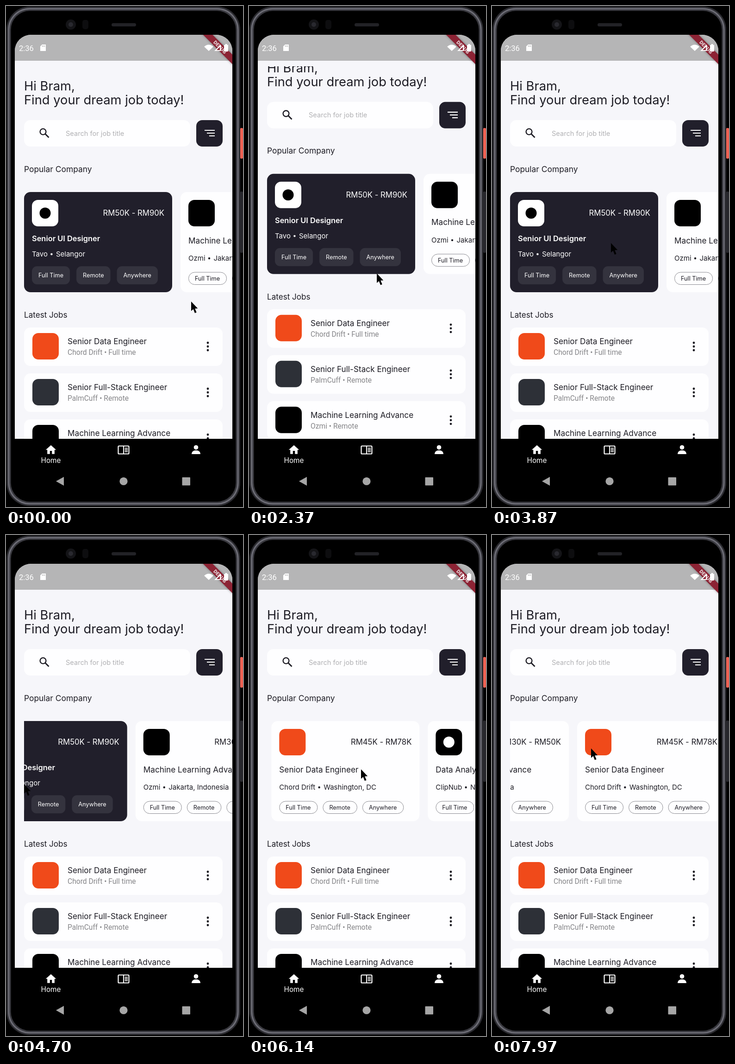
An HTML page with a canvas that plays this animation: 512 px wide and 1080 px high, repeating every 8000 ms.

```html
<!DOCTYPE html>
<html lang="en">
<head>
<meta charset="utf-8">
<title>Job finder</title>
<style>
html, body { margin: 0; width: 100%; height: 100%; overflow: hidden; background: #000; }
canvas { display: block; width: 100vw; height: 100vh; }
</style>
</head>
<body>
<canvas id="stage" width="512" height="1080"></canvas>
<script>
const ctx = document.getElementById('stage').getContext('2d');
const LOOP = 8000;
const SANS = 'Inter, sans-serif';
const ROBOTO = 'Roboto, sans-serif';
const INK = '#1d1c24', DARK = '#211f2b', PAPER = '#f6f6fa', CARD = '#fefeff';
const ORANGE = '#f04a1a', RIBBON = '#8c2334', BAR = '#b5b5b6';
const PITCH = 338;

const companies = [
  { name: 'Tavo', city: 'Selangor', role: 'Senior UI Designer', pay: 'RM50K - RM90K', tile: '#fff', mark: '#000' },
  { name: 'Ozmi', city: 'Jakarta, Indonesia', role: 'Machine Learning Advance', pay: 'RM30K - RM50K', tile: '#000' },
  { name: 'Chord Drift', city: 'Washington, DC', role: 'Senior Data Engineer', pay: 'RM45K - RM78K', tile: ORANGE },
  { name: 'ClipNub', city: 'New York, US', role: 'Data Analyst', pay: 'RM55K - RM80K', tile: '#000', mark: '#fff' }
];
const jobs = [
  { role: 'Senior Data Engineer', info: 'Chord Drift • Full time', tile: ORANGE },
  { role: 'Senior Full-Stack Engineer', info: 'PalmCuff • Remote', tile: '#2d3037' },
  { role: 'Machine Learning Advance', info: 'Ozmi • Remote', tile: '#000' },
  { role: 'System Safety Engineer', info: 'Mulbo.inc • Remote', tile: '#000', mark: '#fff' }
];
const labels = ['Full Time', 'Remote', 'Anywhere'];

// Places the pointer passes through
const stops = [
  { t: 0, x: 400, y: 637 },
  { t: 1670, x: 355, y: 656 },
  { t: 2930, x: 220, y: 520 },
  { t: 3870, x: 257, y: 511 },
  { t: 4700, x: 39, y: 537 },
  { t: 6140, x: 242, y: 505 },
  { t: 7970, x: 214, y: 460 }
];

const mix = (a, b, p) => a + (b - a) * p;

function ramp(t, from, to) {
  const p = Math.min(1, Math.max(0, (t - from) / (to - from)));
  return p * p * (3 - 2 * p);
}

const scrollAt = t => 138.5 * (ramp(t, 2150, 2780) - ramp(t, 3000, 3500));
const glowAt = t => ramp(t, 2700, 2850) - ramp(t, 2950, 3200);
const slideAt = t => 884 * ramp(t, 4070, 7130) - 353 * ramp(t, 7200, 7970);

function pointerAt(t) {
  const i = Math.max(1, stops.findIndex(s => s.t > t));
  const a = stops[i - 1], b = stops[i];
  const p = ramp(t, a.t, b.t);
  return t >= stops.at(-1).t ? stops.at(-1) : { x: mix(a.x, b.x, p), y: mix(a.y, b.y, p) };
}

function box(x, y, w, h, r, fill, stroke, line = 1) {
  ctx.beginPath();
  ctx.roundRect(x, y, w, h, r);
  if (fill) { ctx.fillStyle = fill; ctx.fill(); }
  if (stroke) { ctx.strokeStyle = stroke; ctx.lineWidth = line; ctx.stroke(); }
}

function dot(x, y, r, fill) {
  ctx.beginPath();
  ctx.arc(x, y, r, 0, 7);
  ctx.fillStyle = fill;
  ctx.fill();
}

function shape(path, x, y, fill, scale = 1) {
  ctx.save();
  ctx.translate(x, y);
  ctx.scale(scale, scale);
  ctx.fillStyle = fill;
  ctx.fill(new Path2D(path));
  ctx.restore();
}

function line(x0, y0, x1, y1, color, width) {
  ctx.beginPath();
  ctx.moveTo(x0, y0);
  ctx.lineTo(x1, y1);
  ctx.strokeStyle = color;
  ctx.lineWidth = width;
  ctx.stroke();
}

function text(str, x, y, size, color = INK, align = 'left', weight = 400, family = SANS) {
  ctx.font = `${weight} ${size}px ${family}`;
  ctx.textAlign = align;
  ctx.fillStyle = color;
  ctx.fillText(str, x, y);
  return ctx.measureText(str).width;
}

function clipped(x, y, w, h, draw, r = 0) {
  ctx.save();
  ctx.beginPath();
  ctx.roundRect(x, y, w, h, r);
  ctx.clip();
  draw();
  ctx.restore();
}

function tile(x, y, { tile: fill, mark }) {
  box(x, y, 57, 57, 13, fill);
  if (mark) dot(x + 28.5, y + 28.5, 12, mark);
}

function phone() {
  ctx.fillStyle = '#000';
  ctx.fillRect(0, 0, 512, 1080);
  box(506, 263, 6, 66, 2, '#ee6152');
  box(506, 400, 6, 132, 2, '#26262b');
  // Rim: nested outlines from the edge inwards
  ['#2c2c31', '#6c6c75', '#39393f', '#000'].forEach((shade, i) => {
    const inset = 1 + i * 3.2;
    box(inset, inset, 507 - 2 * inset, 1079 - 2 * inset, 51 - inset, shade);
  });
  dot(140, 40, 11, '#141417');
  dot(140, 40, 5, '#29292f');
  box(165, 30, 13, 20, 5, '#0d0d0f');
  box(228, 37, 53, 7, 3.5, '#222226');
}

function statusBar() {
  ctx.fillStyle = BAR;
  ctx.fillRect(19, 62, 470, 56);
  ctx.save();
  ctx.translate(462.5, 88.5);
  ctx.rotate(Math.PI / 4);
  ctx.shadowColor = 'rgba(0,0,0,.4)';
  ctx.shadowBlur = 5;
  ctx.fillStyle = RIBBON;
  ctx.fillRect(-60, -7.2, 120, 14.4);
  ctx.shadowBlur = 0;
  text('DEBUG', 0, 4, 11, '#e6d3d6', 'center', 800, ROBOTO);
  ctx.restore();

  text('2:36', 28, 96.5, 16.5, '#fff', 'left', 400, ROBOTO);
  shape('M4 0h8v14H0V4z', 74, 83, '#fff');
  for (let i = 0; i < 3; i++) line(78.5 + i * 2.5, 85, 78.5 + i * 2.5, 88, BAR, 1.2);
  ctx.beginPath();
  ctx.moveTo(438, 97);
  ctx.arc(438, 97, 13.5, -Math.PI * 0.76, -Math.PI * 0.24);
  ctx.fillStyle = '#fff';
  ctx.fill();
  shape('M14 0v14H0z', 450, 83, '#fff');
  shape('M7 0v7H0z', 455, 88, RIBBON);
  shape('M2.5 0h4v2H9v14H0V2h2.5z', 471, 82, '#fff');
}

function searchRow() {
  box(39, 246, 359, 57, 14, CARD);
  ctx.beginPath();
  ctx.arc(80, 271, 6.4, 0, 7);
  ctx.strokeStyle = INK;
  ctx.lineWidth = 2.4;
  ctx.stroke();
  line(84.5, 275.5, 92.5, 283.5, INK, 2.8);
  text('Search for job title', 129, 279.5, 14.6, '#b0b0b3');
  box(411, 246, 57, 57, 13, DARK);
  for (let i = 0; i < 3; i++) line(429 + i * 5, 268 + i * 6, 451, 268 + i * 6, '#fff', 2.2);
}

function chips(left, picked, ink) {
  const size = 12.7;
  ctx.font = `400 ${size}px ${SANS}`;
  let x = left;
  for (const label of labels) {
    const w = ctx.measureText(label).width + 28;
    if (picked) box(x, 561, w, 39, 11, '#34333e');
    else box(x + 0.5, 574, w, 26.5, 13.2, null, '#8a8a90');
    text(label, x + w / 2, picked ? 585 : 592, size, ink, 'center');
    x += w + (picked ? 14 : 12);
  }
}

function companyCard(c, x, picked) {
  const ink = picked ? '#fff' : INK;
  const left = x + 17;
  box(x, 401, 320, 216, 14, picked ? DARK : CARD);
  tile(left, 418, c);
  text(c.pay, x + 303, 452, 16.7, ink, 'right');
  if (picked) text(c.role, left, 507, 16.4, ink, 'left', 600);
  else text(c.role, left, 511.5, 17.2, ink);

  const base = picked ? 540 : 549;
  const w = text(c.name, left, base, 15, ink);
  dot(left + w + 8.5, base - 5, 2.2, ink);
  text(c.city, left + w + 18, base, 15, ink);
  chips(left, picked, ink);
}

function jobRow(job, i) {
  const y = 693 + i * 99;
  box(39, y, 429, 83, 14, CARD);
  tile(57, y + 12, job);
  text(job.role, 133, y + 36, 17.2);
  text(job.info, 133, y + 59, 15.6, '#858588', 'left', 400, ROBOTO);
  for (let k = 0; k < 3; k++) dot(436, y + 33 + k * 8, 2.4, INK);
}

function page(scroll, slide, glow) {
  clipped(19, 130, 470, 803, () => {
    ctx.translate(0, -scroll);
    text('Hi Bram,', 39, 182, 27.3);
    text('Find your dream job today!', 39, 212, 27.3);
    searchRow();
    text('Popular Company', 39, 357.5, 17.4);
    clipped(39, 395, 450, 230, () =>
      companies.forEach((c, i) => companyCard(c, 39 + i * PITCH - slide, i === 0)));
    text('Latest Jobs', 39, 672, 17.1);
    jobs.forEach(jobRow);
  });
  if (glow > 0) {
    const radius = 2500;
    clipped(39, 880, 450, 53, () =>
      dot(210, 933 - 23 * glow + radius, radius, `rgba(190,225,240,${0.5 * glow})`));
  }
}

function navBar() {
  ctx.fillStyle = '#000';
  ctx.fillRect(19, 933, 470, 119);
  shape('M10 20v-6h4v6h5v-8h3L12 3 2 12h3v8z', 83.6, 943.4, '#fff', 1.12);
  text('Home', 97, 985, 15.3, '#fff', 'center');

  box(242.5, 948.5, 23, 17, 1.5, null, '#fff', 2.2);
  line(254, 949, 254, 965, '#fff', 2);
  for (let y = 953.5; y < 962; y += 3.5) line(256.5, y, 263, y, '#fff', 2);
  dot(410.5, 951.5, 4.8, '#fff');
  box(401, 958, 19, 8, [8, 8, 0, 0], '#fff');

  const grey = '#a6a6a6';
  shape('M0 9.5L17 0v19z', 108, 1015, grey);
  dot(254, 1024.5, 8.6, grey);
  box(380.5, 1016, 17.5, 17.5, 1, grey);
}

function frame(now) {
  const t = now % LOOP;
  phone();
  clipped(19, 62, 470, 990, () => {
    ctx.fillStyle = PAPER;
    ctx.fillRect(19, 62, 470, 871);
    page(scrollAt(t), slideAt(t), glowAt(t));
    statusBar();
    navBar();
  }, 35);
  const { x, y } = pointerAt(t);
  shape('M0 0v20.5l4.6-4.1L8 25l3.6-1.5-3.4-8.3 6-.2z', x, y, '#000');
}

const start = performance.now();
function tick() {
  frame(performance.now() - start);
  requestAnimationFrame(tick);
}
tick();
</script>
</body>
</html>
```
